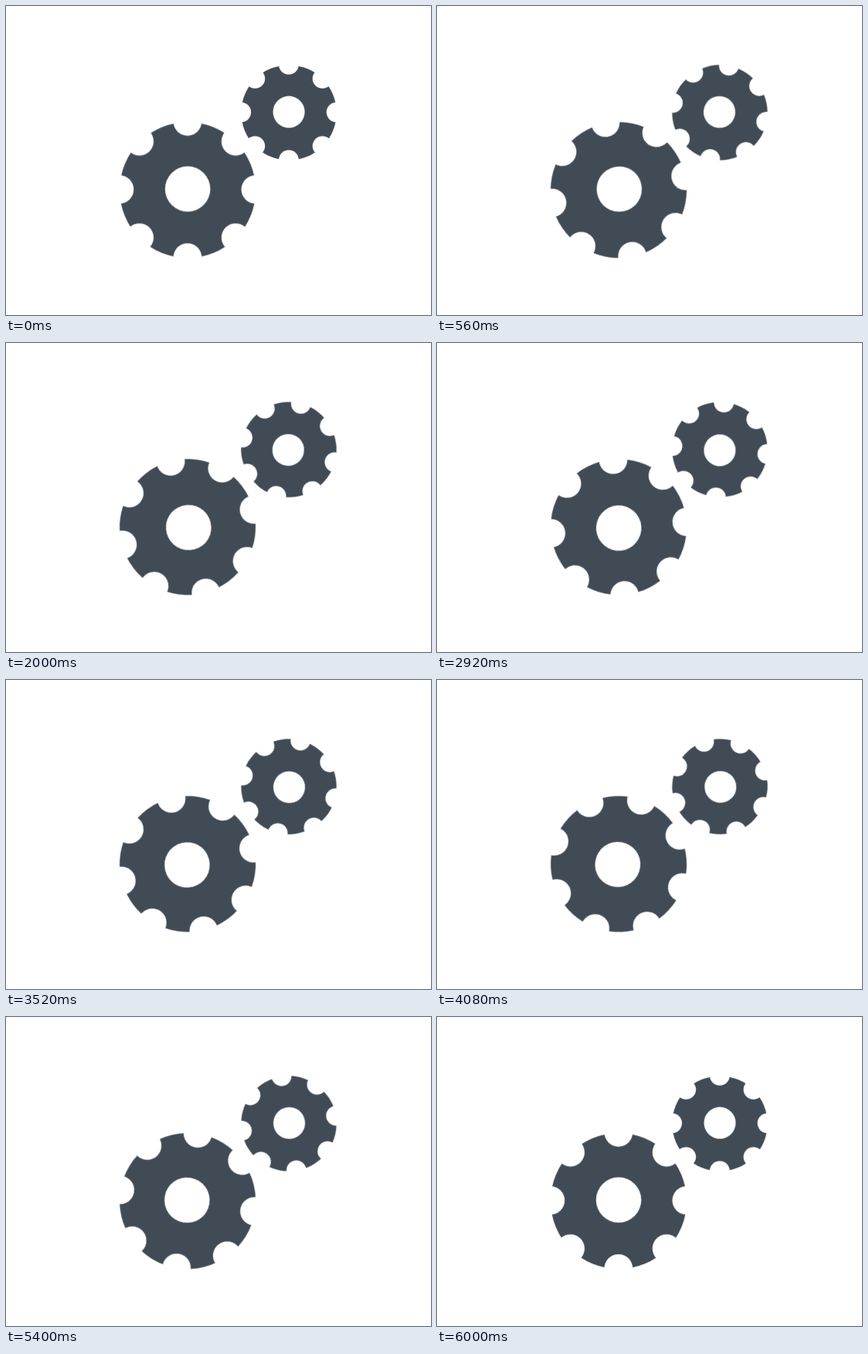
An HTML page without scripts that plays this animation: 550 px wide and 400 px high, repeating every 6.04 s.

```html
<!DOCTYPE html>
<html lang="en">
<head>
<meta charset="utf-8">
<title>Gears</title>
<style>
  html, body { margin: 0; width: 100%; height: 100%; overflow: hidden; background: #fff; }
  svg { display: block; width: 100vw; height: 100vh; }
  .spin { animation: turn 6.04s steps(151) infinite; transform-origin: 0 0; }
  .back { animation-name: turn-back; }
  /* 2.4deg per step; the last step is a full turn */
  @keyframes turn { from { transform: rotate(0deg); } to { transform: rotate(362.4deg); } }
  @keyframes turn-back { from { transform: rotate(0deg); } to { transform: rotate(-362.4deg); } }
</style>
</head>
<body>
<svg viewBox="0 0 550 400">
  <defs>
    <circle id="notch" cy="-88" r="18.35"/>
    <g id="pair">
      <use href="#notch"/>
      <use href="#notch" transform="rotate(45)"/>
    </g>
    <mask id="cut" maskUnits="userSpaceOnUse" x="-110" y="-110" width="220" height="220">
      <rect x="-110" y="-110" width="220" height="220" fill="#fff"/>
      <!-- holes sit slightly off the axle -->
      <g transform="translate(-.2 -.7)">
        <use href="#pair"/>
        <use href="#pair" transform="rotate(90)"/>
        <use href="#pair" transform="rotate(180)"/>
        <use href="#pair" transform="rotate(270)"/>
      </g>
      <circle cy="-1.35" r="29.3"/>
    </mask>
    <g id="gear"><circle r="88" fill="#414b55" mask="url(#cut)"/></g>
  </defs>
  <g transform="translate(235.1 238.2)">
    <g class="spin"><use href="#gear"/></g>
  </g>
  <g transform="translate(366 138) scale(.701)">
    <g class="spin back"><use href="#gear"/></g>
  </g>
</svg>
</body>
</html>
```
